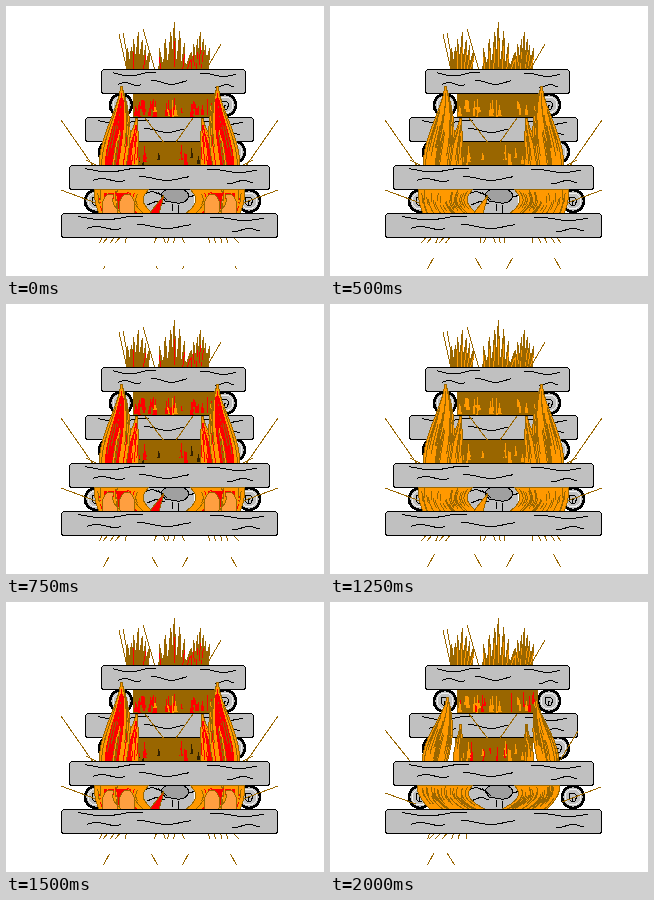
An HTML page that plays this animation: 318x270 px, repeating every 2250 ms.

```html
<!DOCTYPE html>
<html lang="en">
<head>
<meta charset="utf-8">
<title>Campfire</title>
<style>
  html, body { margin: 0; width: 100%; height: 100%; overflow: hidden; background: #fff; }
  svg { display: block; width: 318px; height: 270px; shape-rendering: crispEdges; }
</style>
</head>
<body>
<svg id="stage" viewBox="0 0 318 270" fill="none" stroke-width="1"></svg>
<script>
const stage = document.getElementById('stage');
const BROWN = '#960', ORANGE = '#f90', RED = '#f00', PALE = '#ff9f40', GREY = '#c0c0c0';
const { sin, PI, abs, floor } = Math;
let seed = 1;
const rnd = () => (seed = seed * 16807 % 2147483647) / 2147483647;
const pick = list => list[floor(rnd() * list.length)];
const range = (n, f) => Array.from({ length: n }, (_, i) => f(i));
const repeat = (n, f) => range(n, f).join('');

const poly = (pts, fill, stroke = 'none') =>
  `<polygon points="${pts.join(' ')}" fill="${fill}" stroke="${stroke}"/>`;
const line = (pts, stroke = BROWN) => `<polyline points="${pts.join(' ')}" stroke="${stroke}"/>`;
const flip = s => `<g transform="matrix(-1 0 0 1 327 0)">${s}</g>`;
const box = (x, y, w, h, fill) => `<rect x="${x}" y="${y}" width="${w}" height="${h}" fill="${fill}"/>`;

// Shapes have a top, a bottom and two edges; t runs 0..1 downwards.
const tongue = (tip, top, l, r, bulge) => ({
  top, bottom: 161,
  left: t => tip + (l - tip) * sin(PI / 2 * t) ** 1.5,
  right: t => tip + 1 + (r - tip) * t + bulge * sin(PI * t)
});
const bowl = (l, r, lean) => ({
  top: 183, bottom: 208,
  left: t => l + lean * t * t,
  right: t => r - 7 * sin(PI * t) + lean * t * t
});

// Runs down a shape at fraction f of its width, from a to b
const rib = (s, f, a = 0, b = 1) => range(9, i => {
  const t = a + (b - a) * i / 8, l = s.left(t);
  return [l + (s.right(t) - l) * f, s.top + (s.bottom - s.top) * t];
});
const band = (s, f, g, a, fill, stroke) =>
  poly([...rib(s, f, a), ...rib(s, g, a).reverse()], fill, stroke);

const flame = (s, n, cols, core) =>
  band(s, 0, 1, 0, ORANGE, BROWN) +
  (core ? band(s, .2, .72, .15, core) : '') +
  repeat(n, () => {
    const a = rnd() * .7;
    return line(rib(s, .05 + rnd() * .9, a, Math.min(1, a + .25 + rnd() * .5)), pick(cols));
  });

// Upright licks of fire filling a box
const licks = (x0, x1, y0, y1, n, cols) => repeat(n, () => {
  const x = x0 + rnd() * (x1 - x0), top = y0 + rnd() * (y1 - y0) * .6;
  const end = top + (y1 - top) * (.5 + rnd() * .5), w = .8 + rnd() * 1.4;
  return poly([[x, top], [x + w, end], [x - w, end]], pick(cols));
});

// A cluster of spikes above the pile, tallest in the middle
const spikes = (mid, half, height, cols) => repeat(7, i => {
  const d = (i - 3) / 3, x = mid + d * half;
  const h = height * (1 - abs(d) * (.4 + rnd() * .3)), tip = [x + d * 2 + rnd() * 2, 64 - h];
  return poly([tip, [x + 2.5, 64], [x - 2, 64]], BROWN, BROWN) +
    line([[tip[0], tip[1] + h * .4], [x, 64]], pick(cols));
});
const crown = cols =>
  spikes(131, 9, 38, cols) + spikes(193, 7, 38, cols) + spikes(168, 13, 48, cols) +
  line([[117, 27], [124, 64]]) + line([[113, 28], [121, 64]]) +
  line([[137, 23], [149, 64]]) + line([[215, 38], [200, 64]]);

// Grain: a wave between two fractions of the log's width
const grain = (x, w, a, b, y, amp, turn) => line(range(9, i =>
  [x + w * (a + (b - a) * i / 8), y + amp * sin(turn + i * .75)]), '#000');
const log = (x, y, w) =>
  `<rect x="${x + .5}" y="${y + .5}" width="${w}" height="24" rx="3" fill="${GREY}" stroke="#000"/>` +
  grain(x, w, .08, .38, y + 5, 2, 5.5) + grain(x, w, .12, .28, y + 15, 1.5, 3) +
  grain(x, w, .35, .6, y + 13.5, 2, 4.5) + grain(x, w, .69, .94, y + 6, 1.5, 4) +
  grain(x, w, .79, .92, y + 17, 1.5, 1);

const end = (x, y) =>
  `<circle cx="${x}" cy="${y}" r="11" fill="${GREY}" stroke="#000" stroke-width="2.6"/>
   <circle cx="${x}" cy="${y}" r="8" stroke="#eee"/>
   <path d="M${x - 4} ${y - 4}h5l3 3-2 5h-3v-4h2M${x - 4} ${y - 4}v6l3 3" stroke="#000"/>`;

const stones = `<path d="M155 189q2-6 10-6h10q8 2 8 8-4 7-12 6l-12-2z" fill="#a0a0a0" stroke="#000"/>
  <path d="M139 188l7-3 9 4M141 199l10-4 8 3M166 198v7M172 199v8M183 191l7-2M152 186l9 8" stroke="#000"/>`;

const roots = (x, n) => repeat(n, i => {
  const r = x + i * 6;
  return line([[r, 230], [r + (r - 163) * .08 + rnd() * 6 - 3, 237]]);
});

function scene(kind) {
  seed = 4711;
  const open = kind === 'open', red = kind === 'red', core = red && RED;
  const mix = kind === 'gold' ? [BROWN, BROWN, ORANGE, ORANGE] : [BROWN, RED, ORANGE, ORANGE];
  const streak = red ? [BROWN, ORANGE, ORANGE, RED] : [BROWN];
  const both = make => open ? make(0) + flip(make(1)) : (s => s + flip(s))(make(0));

  let s = crown(red ? [RED, BROWN] : [ORANGE, BROWN, ORANGE]);
  s += end(115, 99) + end(219, 99) + end(104, 146) + end(228, 146) + end(90, 195) + end(243, 195);
  s += box(127, 87, 81, 25, BROWN) + licks(128, 206, 87, 112, 45, red ? [RED, BROWN, RED, ORANGE] : mix);
  s += box(125, 135, 78, 26, BROWN) + licks(126, 202, 135, 161, 40, red ? [BROWN, BROWN, RED, '#320'] : mix);
  s += log(95, 63, 144) + log(79, 111, 168);
  s += line([[139, 112], [165, 146]]) + line([[187, 112], [163, 146]]);

  s += both(right => {
    const inner = tongue(130, open ? 122 : 112, open ? 123 : 113, 131, 1);
    const outer = !open ? tongue(115, 80, 93, 119, 6) :
      right ? tongue(120, 98, 98, 118, 4) : tongue(117, 95, 92, 116, 5);
    return flame(inner, 9, streak, core) + flame(outer, 22, streak, core);
  });
  s += open ?
    line([[55, 128], [80, 159]]) + line([[55, 191], [86, 202]]) +
    line([[248, 129], [229, 160]]) + line([[271, 185], [232, 200]]) :
    both(() => line([[55, 114], [87, 160]]) + line([[55, 184], [90, 197]]) + line([[80, 154], [92, 160]]));

  s += log(63, 159, 200) + box(138, 184, 50, 23, GREY) + stones;
  s += both(right => {
    const b = open ? bowl(right ? 97 : 87, 143, 14) : bowl(88, 143, 5);
    const glow = x => `<ellipse cx="${x}" cy="201" rx="8" ry="13" fill="${PALE}" stroke="${BROWN}"/>`;
    return flame(b, 34, streak, core) + (red ? glow(121) + glow(104) + flame(bowl(109, 113, 3), 4, streak) : '');
  });
  if (!open) s += poly([[158, 189], [153, 208], [143, 208]], red ? RED : ORANGE, BROWN);
  s += open ? roots(100, 7) : roots(97, 5) + roots(151, 5) + roots(202, 5);
  return s + log(55, 207, 216);
}

// Sparks on the ground lean from x at y 250 to x + dx at y 263
const spark = (x, dx, top) => line([[x + dx * (top - 250) / 13 + .5, top], [x + dx + .5, 263]]);
const sparks = (open, top) => open ?
  spark(104, -7, top) + spark(116, 8, top) :
  spark(104, -7, top) + spark(144, 7, top) + spark(183, -7, top) + spark(223, 7, top);

const scenes = { red: scene('red'), open: scene('open'), gold: scene('gold') };
const ORDER = ['red', 'open', 'gold', 'red', 'open', 'gold', 'red', 'red', 'open'];
const SPARK_TOP = [260, 254, 252, 253, 252, 250, 252, 250, 251];
let shown = -1;

function draw() {
  const step = floor(performance.now() % 2250 / 250);
  if (step !== shown) {
    const kind = ORDER[step];
    stage.innerHTML = scenes[kind] + sparks(kind === 'open', SPARK_TOP[step]);
    shown = step;
  }
  requestAnimationFrame(draw);
}
draw();
</script>
</body>
</html>
```
